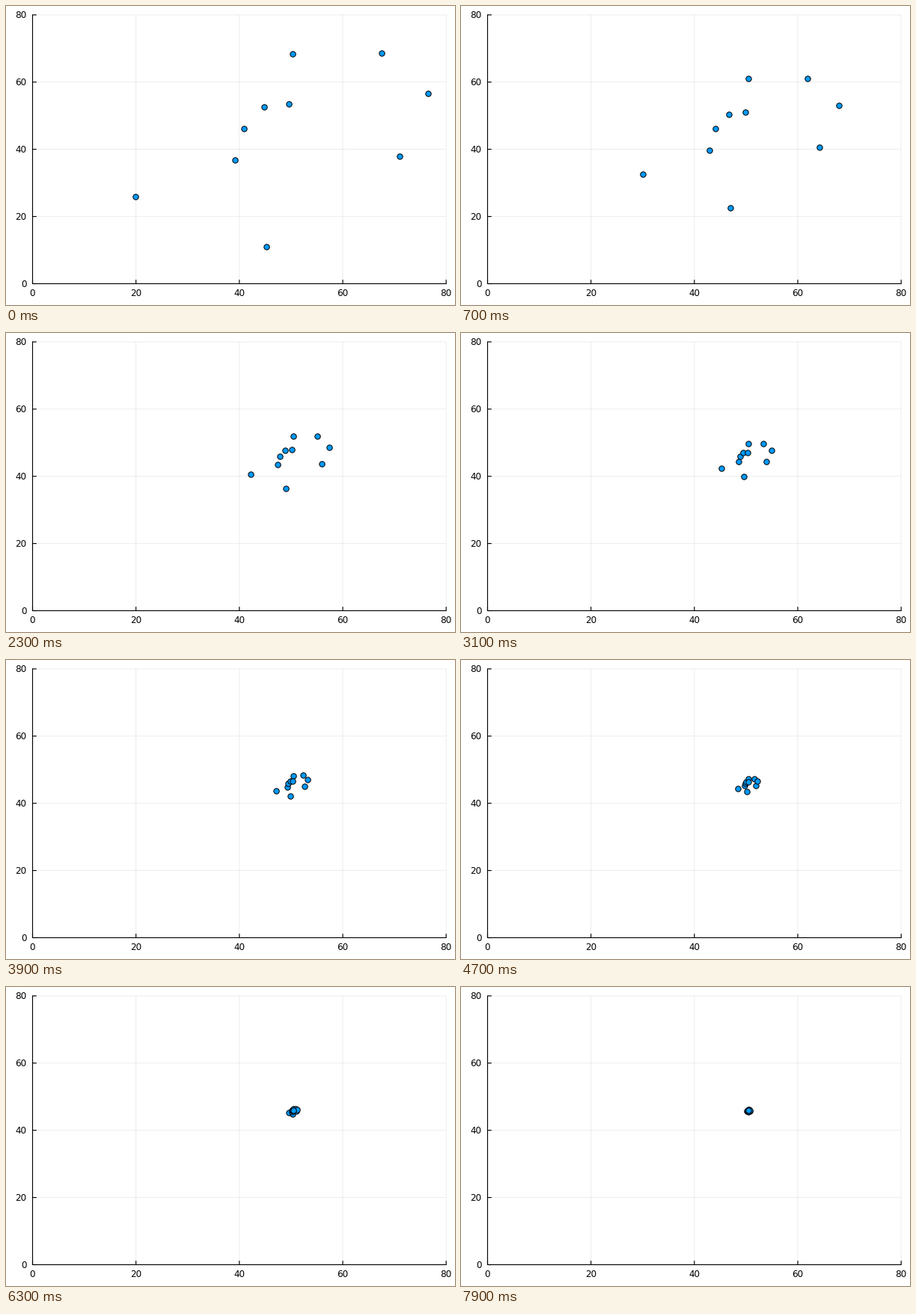
Recreate the animation shown at these times as a matplotlib script. Size 600 by 400 pixels, loop 8 s.

```python
import numpy as np
import matplotlib.pyplot as plt
from matplotlib.animation import FuncAnimation

W, H, DPI = 600, 400, 100
PX = 72 / DPI                      # one pixel in points
LEFT, RIGHT, TOP, BOTTOM = 35.5, 588.2, 11.9, 371.5
FRAMES, INTERVAL = 80, 100
SHRINK = 1 - 0.05 * 10 / 9         # each step pulls points toward their mean

# Start positions in stage pixels, in drawing order
START = np.array([
    (173.3, 254.7), (348.0, 322.0), (526.2, 200.8), (305.8, 205.8),
    (318.4, 163.6), (344.6, 134.5), (383.4, 64.0), (501.8, 62.9),
    (564.2, 117.2), (377.5, 130.5),
])
CENTER = np.array([384.1, 165.5])

plt.rcParams["font.family"] = "DejaVu Sans"
fig = plt.figure(figsize=(W / DPI, H / DPI), dpi=DPI, facecolor="white")
ax = fig.add_axes([0, 0, 1, 1])
ax.set_xlim(0, W)
ax.set_ylim(H, 0)
ax.axis("off")


def line(xs, ys, width=1.15, **kw):
    ax.plot(xs, ys, color="black", lw=width * PX, snap=False,
            solid_capstyle="butt", **kw)


def label(x, y, value, ha):
    ax.text(x, y, str(value), fontsize=12 * PX, ha=ha, va="baseline")


for value in range(0, 81, 20):
    x = LEFT + (RIGHT - LEFT) * value / 80
    y = BOTTOM + (TOP - BOTTOM) * value / 80
    if value:
        line([x, x], [TOP, BOTTOM], 0.9, alpha=0.08, zorder=1)
        line([LEFT, RIGHT], [y, y], 0.9, alpha=0.08, zorder=1)
    line([x, x], [BOTTOM, BOTTOM - 5.3], zorder=2)
    line([LEFT, LEFT + 5.3], [y, y], zorder=2)
    label(x, 387.6, value, "center")
    label(27.6, y + 4.5, value, "right")

line([LEFT, RIGHT + 0.5], [BOTTOM, BOTTOM], zorder=2)
line([LEFT, LEFT], [TOP - 0.5, BOTTOM + 0.5], zorder=2)

dots = ax.scatter(*START.T, s=(7.4 * PX) ** 2, c="#009AF9",
                  edgecolors="black", linewidths=PX, zorder=3)


def update(i):
    dots.set_offsets(CENTER + (START - CENTER) * SHRINK ** i)
    return (dots,)


anim = FuncAnimation(fig, update, frames=FRAMES, interval=INTERVAL,
                     repeat=True, repeat_delay=0)
plt.show()
```
